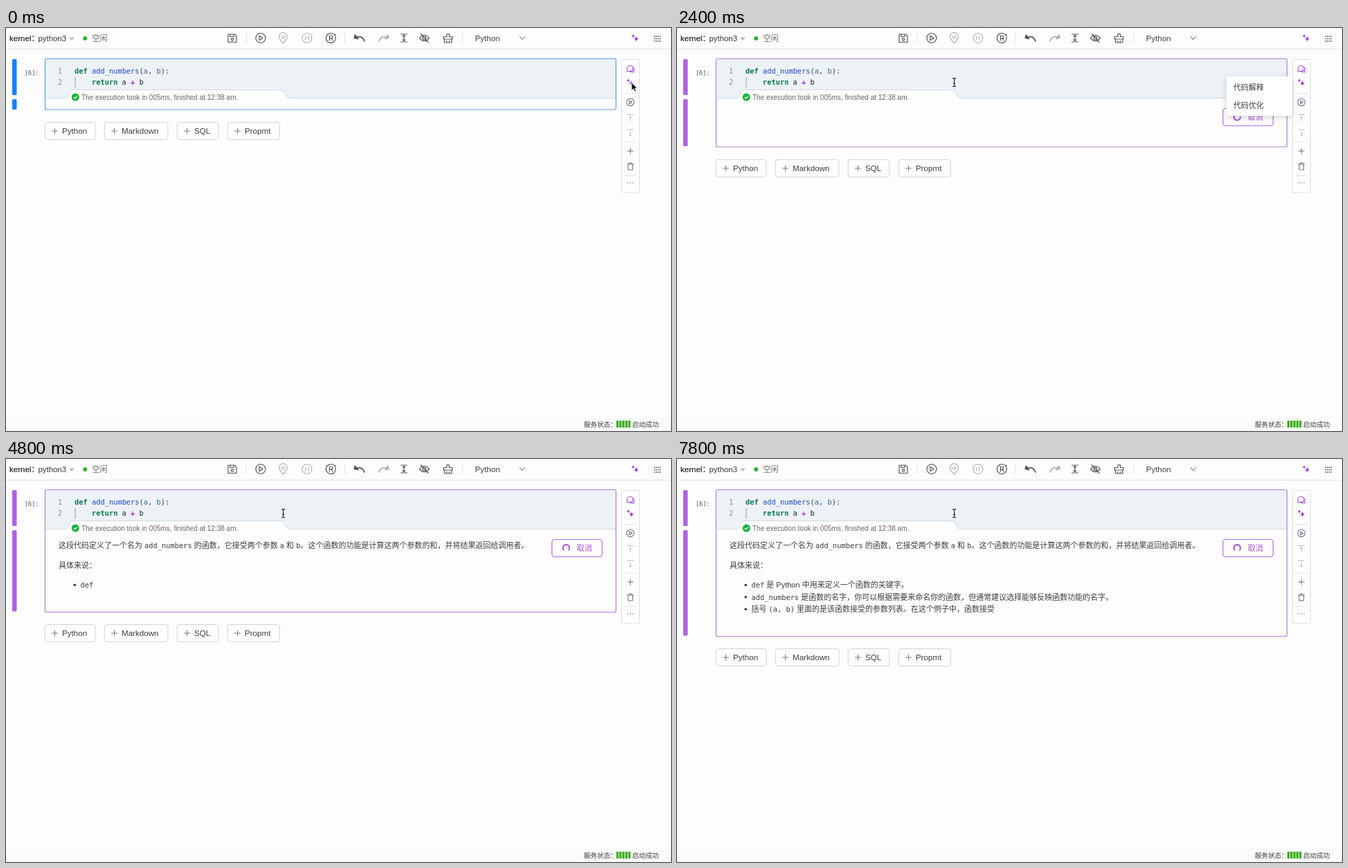
Write an HTML page that moves like this. It is 961 by 583 pixels and loops after 8000 ms.

```html
<!DOCTYPE html>
<html lang="zh-CN">
<head>
<meta charset="utf-8">
<title>Notebook assistant</title>
<style>
html, body { margin: 0; width: 100%; height: 100%; overflow: hidden; background: #fdfdfd; }
svg { display: block; width: 961px; height: 583px; --accent: #1a80ff; --edge: #5b9fde; }
svg.ai { --accent: #b163df; --edge: #b680d9; }
text { font: 11.6px "Liberation Sans", "Noto Sans CJK SC", sans-serif; fill: #3c3c3c; white-space: pre; }
.cjk text, text.cjk { font-size: 11px; }
.code, .code text { font: 10.37px "DejaVu Sans Mono", "Noto Sans CJK SC", monospace; }
.line { fill: none; stroke: #555; stroke-width: 1.2; stroke-linecap: round; stroke-linejoin: round; }
.thin { fill: none; stroke: #e2e2e2; }
.pale { stroke: #b3b3b3; }
.kw { fill: #08794a; font-weight: bold; }
.fn { fill: #1746c8; }
.arg { fill: #39618c; }
.op { fill: #a421e6; font-weight: bold; }
.purple { fill: #a94ed6; }
</style>
</head>
<body>
<svg id="stage" viewBox="0 0 961 583">
  <defs>
    <filter id="shadow" x="-20%" y="-20%" width="140%" height="150%">
      <feDropShadow dx="0" dy="2" stdDeviation="4" flood-opacity=".16"/>
    </filter>
    <g id="sparkle" fill="#a53bdc">
      <path d="M1.8-2.6Q2.4 1.2 5.6 1.8Q2.4 2.4 1.8 5.8Q1.2 2.4-2 1.8Q1.2 1.2 1.8-2.6Z"/>
      <path d="M-2.7-5Q-2.3-2.7-.3-2.3Q-2.3-1.9-2.7.3Q-3.1-1.9-5.1-2.3Q-3.1-2.7-2.7-5Z"/>
    </g>
    <g id="play"><circle r="7"/><path d="M-2-3.2V3.2L3.2 0Z"/></g>
    <path id="plus" d="M-4 0H4M0-4V4"/>
  </defs>
  <rect width="961" height="583" fill="#fdfdfd"/>

  <!-- toolbar -->
  <path class="thin" d="M0 30.5H961"/>
  <text x="5" y="18.5" style="fill:#222" stroke="#222" stroke-width=".2">kernel：</text>
  <text x="46.5" y="18.5" style="font-size:11.4px;fill:#333">python3</text>
  <path d="M91 13.5H99L95 18Z" fill="#bbb"/>
  <circle cx="114.3" cy="15" r="3" fill="#2fae35"/>
  <text class="cjk" x="124.5" y="18.7" style="fill:#666">空闲</text>
  <path class="thin" d="M347.5 7V22M489.5 7V22M659.5 7V22"/>
  <g class="line">
    <path d="M321 9H330.5L333 11.500V20.500H321ZM324 9V12.500H329V9"/>
    <circle cx="327" cy="16.500" r="1.700"/>
    <use href="#play" x="368" y="14.500"/>
    <g class="pale" transform="translate(400.500 14.500)">
      <path d="M0 7.500C-4 4-6-1.500-6-2A6 5.800 0 0 1 6-2C6-1.500 4 4 0 7.500Z"/><circle cy="-1.500" r="2"/>
    </g>
    <g class="pale" transform="translate(435 14.500)"><circle r="7"/><path d="M-2-2.500V2.500M2-2.500V2.500"/></g>
    <g transform="translate(469.500 14.500)">
      <path d="M6.500-2.500A7 7 0 1 1 3.500-6M-2 3.500V-3.500H.5A1.900 1.900 0 0 1 .5.4H-2M.5.4L2.500 3.500"/>
      <circle cx="5.700" cy="-4.700" r=".8" fill="#555"/>
    </g>
    <path d="M505 14C511 11 516 13 518 19" stroke-width="1.700"/>
    <path d="M503 14.500L504.500 9.800L509 15.800Z" fill="#555"/>
    <g class="pale">
      <path d="M551.500 14C545.500 11 541 13 539 19" stroke-width="1.700"/>
      <path d="M553.500 14.500L552 9.800L547.500 15.800Z" fill="#b3b3b3"/>
    </g>
    <path d="M570.500 9H579.500M570.500 20H579.500M575 10.500V18.500M573.300 12L575 10.300L576.700 12M573.300 17L575 18.700L576.700 17"/>
    <path d="M597.500 14.500Q604.500 6 611.500 14.500Q604.500 23 597.500 14.500ZM599.500 8.500L610 20.500"/>
    <circle cx="604.500" cy="14.500" r="2.500"/>
    <path d="M637 8.500H640.500V12.500H645V16H632.500V12.500H637ZM633.500 16V21H644V16M637 18.500V21M640.500 18.500V21"/>
    <path d="M742.500 12.500L746 16.700L749.700 12.500" stroke-width="1"/>
  </g>
  <text x="677.800" y="18.500">Python</text>
  <use href="#sparkle" x="909" y="14"/>
  <path d="M936.500 12H946.500M936.500 15.500H946.500M936.500 19H946.500" stroke="#555" stroke-width="1.500" stroke-dasharray="1.700 1"/>

  <!-- cell -->
  <g fill="var(--accent)">
    <rect x="9" y="45" width="6.500" height="52" rx="1.500"/>
    <rect id="bar" x="9" y="103" width="6.500" height="15" rx="1.500"/>
  </g>
  <path d="M57 45H881V101.500H410Q406 101 405 98Q403 90 396 89.500H99Q93 89.500 91 96Q90 101 86 101.500H57Z" fill="#edf2f7"/>
  <path d="M881 101.500H410Q406 101 405 98Q403 90 396 89.500H99Q93 89.500 91 96Q90 101 86 101.500H57" fill="none" stroke="#cddbe8"/>
  <rect id="cell" x="56.500" y="44.500" width="825" height="73.500" rx="2" fill="none" stroke="var(--edge)" stroke-width="1.200"/>
  <g class="code">
    <text x="27" y="68" style="font-size:8.500px;fill:#3e5878">[6]:</text>
    <text x="75" y="66.300" style="fill:#8b9096">1</text>
    <text x="75" y="82.300" style="fill:#8b9096">2</text>
    <text x="99" y="66.300"><tspan class="kw">def</tspan> <tspan class="fn">add_numbers</tspan>(<tspan class="arg">a</tspan>, <tspan class="arg">b</tspan>):</text>
    <text x="99" y="82.300" style="fill:#222">    <tspan class="kw">return</tspan> a <tspan class="op">+</tspan> b</text>
  </g>
  <path d="M100 71V86.500" stroke="#999"/>
  <circle cx="100.300" cy="100" r="5.500" fill="#18b13c"/>
  <path d="M97.800 100.200L99.700 102L103 98.300" fill="none" stroke="#fff" stroke-width="1.200"/>
  <text x="109" y="103.500" style="font-size:10px;fill:#666">The execution took in 005ms, finished at 12:38 am.</text>
  <g id="answer" class="cjk"></g>
  <g id="cancel">
    <rect x="789" y="116.500" width="72.500" height="25" rx="4" fill="#fdfdfd" stroke="#b46fdc" stroke-width="1.200"/>
    <path id="spinner" d="M-3.300-3.300A4.700 4.700 0 1 1-3.300 3.300" fill="none" stroke="#b05edc" stroke-width="2.200"/>
    <text class="cjk purple" x="825" y="132.700">取消</text>
  </g>
  <g id="adders"></g>

  <!-- side panel -->
  <rect x="889.500" y="45.500" width="26" height="192.500" rx="2" fill="#fefefe" stroke="#dfdfe3"/>
  <rect id="hover" x="890" y="70" width="25" height="25" fill="#f4f4f5"/>
  <path class="thin" d="M894 94.500H911M894 165H911M894 213.500H911"/>
  <g class="line" style="stroke:#b45bdd">
    <path d="M897.500 63V58.500A4 4 0 0 1 901.500 54.500H903A4 4 0 0 1 903 62.300H900Z"/>
    <path d="M907 57.500Q908.500 60 907 62L907.500 64L905 63.300Q903 64.200 901.500 63"/>
  </g>
  <use href="#sparkle" x="902" y="78.300"/>
  <g class="line" style="stroke:#65687e;stroke-width:1">
    <use href="#play" transform="translate(902.300 107.300) scale(.76)" stroke-width="1.400"/>
    <path class="pale" d="M898 125.500H906.500M902.300 128V134M900.800 129.500L902.300 128L903.800 129.500M898 147H906.500M902.300 150V156M900.800 154.500L902.300 156L903.800 154.500"/>
    <use href="#plus" x="902.300" y="178"/>
    <path d="M898 197H906.700M899 197V205H905.700V197M900.700 196.500V195H904V196.500"/>
    <path d="M898.500 224H906.500" stroke-dasharray=".1 3.700" stroke-width="1.300"/>
  </g>

  <g id="menu">
    <rect x="794" y="70" width="95" height="57" rx="2" fill="#fff" filter="url(#shadow)"/>
    <rect id="item" x="794" y="74" width="95" height="25" fill="#f5f5f5"/>
    <text class="cjk" x="804" y="90.200">代码解释</text>
    <text class="cjk" x="804" y="115.700">代码优化</text>
  </g>

  <!-- status bar -->
  <rect y="563" width="961" height="20" fill="#fbfbfb"/>
  <text x="835" y="576.700" style="font-size:9.600px">服务状态：</text>
  <path d="M882 573H902.500" stroke="#3dae22" stroke-width="10" stroke-dasharray="3.300 1"/>
  <text x="905" y="576.700" style="font-size:9.600px">启动成功</text>

  <!-- pointers -->
  <path id="arrow" d="M0 0V11.500L2.700 9L4.700 13.200L6.700 12.200L4.800 8.200H8.500Z" fill="#111" stroke="#fff" stroke-width=".9"/>
  <path id="hand" d="M-1.200 6V1A1.200 1.200 0 0 1 1.200 1V5.200Q3.200 4.300 3.600 5.800Q5.300 5.200 5.700 6.500Q7.400 6.300 7.400 7.800Q7.400 11 6 13H0Q-1 11-3.600 8.600Q-4.300 7.300-3.200 6.900Q-2.200 6.800-1.200 8Z" fill="#fff" stroke="#222" stroke-width="1.100" stroke-linejoin="round"/>
  <path id="beam" d="M-2.500-6Q-.5-6 0-5Q.5-6 2.500-6M0-5V5M-2.500 6Q-.5 6 0 5Q.5 6 2.500 6M-1.300 1.500H1.300" fill="none" stroke="#222" stroke-width="1.200"/>
</svg>
<script>
const LOOP = 8000, TICK = 200;
const $ = id => document.getElementById(id);
const show = (id, on) => $(id).style.display = on ? '' : 'none';
const move = (id, x, y) => $(id).setAttribute('transform', `translate(${x} ${y})`);

// Backticks enclose inline code.
const LINES = [
  { x: 76, y: 125, text: '这段代码定义了一个名为 `add_numbers` 的函数，它接受两个参数 `a` 和 `b`。这个函数的功能是计算这两个参数的和，并将结果返回给调用者。' },
  { x: 76, y: 153.5, text: '具体来说：' },
  { x: 107.5, y: 182, bullet: true, text: '`def` 是 Python 中用来定义一个函数的关键字。' },
  { x: 107.5, y: 199.5, bullet: true, text: '`add_numbers` 是函数的名字，你可以根据需要来命名你的函数，但通常建议选择能够反映函数功能的名字。' },
  { x: 107.5, y: 217, bullet: true, text: '括号 `(a, b)` 里面的是该函数接受的参数列表。在这个例子中，函数接受' }
];
const plain = text => text.replaceAll('`', '');
let total = 0;
for (const line of LINES) {
  line.start = total;
  total += plain(line.text).length + 1;
}
const TYPING = [
  [2600, 0], [4000, plain(LINES[0].text).indexOf('计算')],
  [5400, LINES[3].start], [6800, LINES[4].start], [7800, total - 1]
];
const POINTER = [
  [0, 904, 79, 'arrow'], [400, 901.5, 82, 'hand'], [1400, 901.5, 82, 'hand'],
  [1800, 832, 84, 'hand'], [2000, 828, 84, 'hand'], [2200, 610, 80, 'beam'], [2400, 400.7, 78.7, 'beam']
];

// Linear interpolation of every numeric column; labels hold until the next key.
function sample(keys, t) {
  const next = keys.findIndex(k => k[0] > t);
  if (next === 0) return keys[0].slice(1);
  if (next < 0) return keys.at(-1).slice(1);
  const a = keys[next - 1], b = keys[next], p = (t - a[0]) / (b[0] - a[0]);
  return a.slice(1).map((v, i) => typeof v === 'number' ? v + (b[i + 1] - v) * p : v);
}

function typed(text, count) {
  return text.split('`').map((part, i) => {
    const cut = part.slice(0, Math.max(0, count));
    count -= part.length;
    return i % 2 ? `<tspan class="code">${cut}</tspan>` : cut;
  }).join('');
}

$('adders').innerHTML = [['Python', 56, 73], ['Markdown', 142, 92], ['SQL', 247, 60], ['Propmt', 320, 75.5]]
  .map(([label, x, w]) => `<rect x="${x + .3}" y=".5" width="${w - .3}" height="25" rx="3.5" fill="#fefefe" stroke="#d3d3d3"/>
    <use href="#plus" class="line" style="stroke:#777;stroke-width:1" x="${x + 14.5}" y="13"/>
    <text x="${x + 25}" y="16.8">${label}</text>`).join('');

function draw(t) {
  const [x, y, kind] = sample(POINTER, t);
  for (const id of ['arrow', 'hand', 'beam']) show(id, id === kind);
  move(kind, x, y);

  const ai = t >= 2200;
  $('stage').classList.toggle('ai', ai);
  show('hover', t >= 400 && t < 1600);
  show('menu', t >= 1400 && t < 2600);
  show('item', t >= 1600 && t < 2200);
  show('cancel', ai);
  $('spinner').setAttribute('transform', `translate(809.5 128.7) rotate(${t * .36 - 18})`);

  const count = Math.round(sample(TYPING, t)[0]);
  const visible = LINES.filter(line => t >= 2600 && count >= line.start);
  $('answer').innerHTML = visible.map(line =>
    (line.bullet ? `<circle cx="99.3" cy="${line.y + .3}" r="1.8" fill="#333"/>` : '') +
    `<text x="${line.x}" y="${line.y + 4}">${typed(line.text, count - line.start)}</text>`).join('');

  const last = visible.at(-1);
  const bottom = ai ? Math.max(172, last ? last.y + 39.5 : 0) : 118;
  $('cell').setAttribute('height', bottom - 44.5);
  $('bar').setAttribute('height', bottom - 103 - (ai ? 1 : 0));
  move('adders', 0, Math.floor(bottom + 18));
}

let shown = -1;
const origin = performance.now();
function frame() {
  const t = Math.floor((performance.now() - origin) % LOOP / TICK) * TICK;
  if (t !== shown) draw(shown = t);
  requestAnimationFrame(frame);
}
frame();
</script>
</body>
</html>
```
